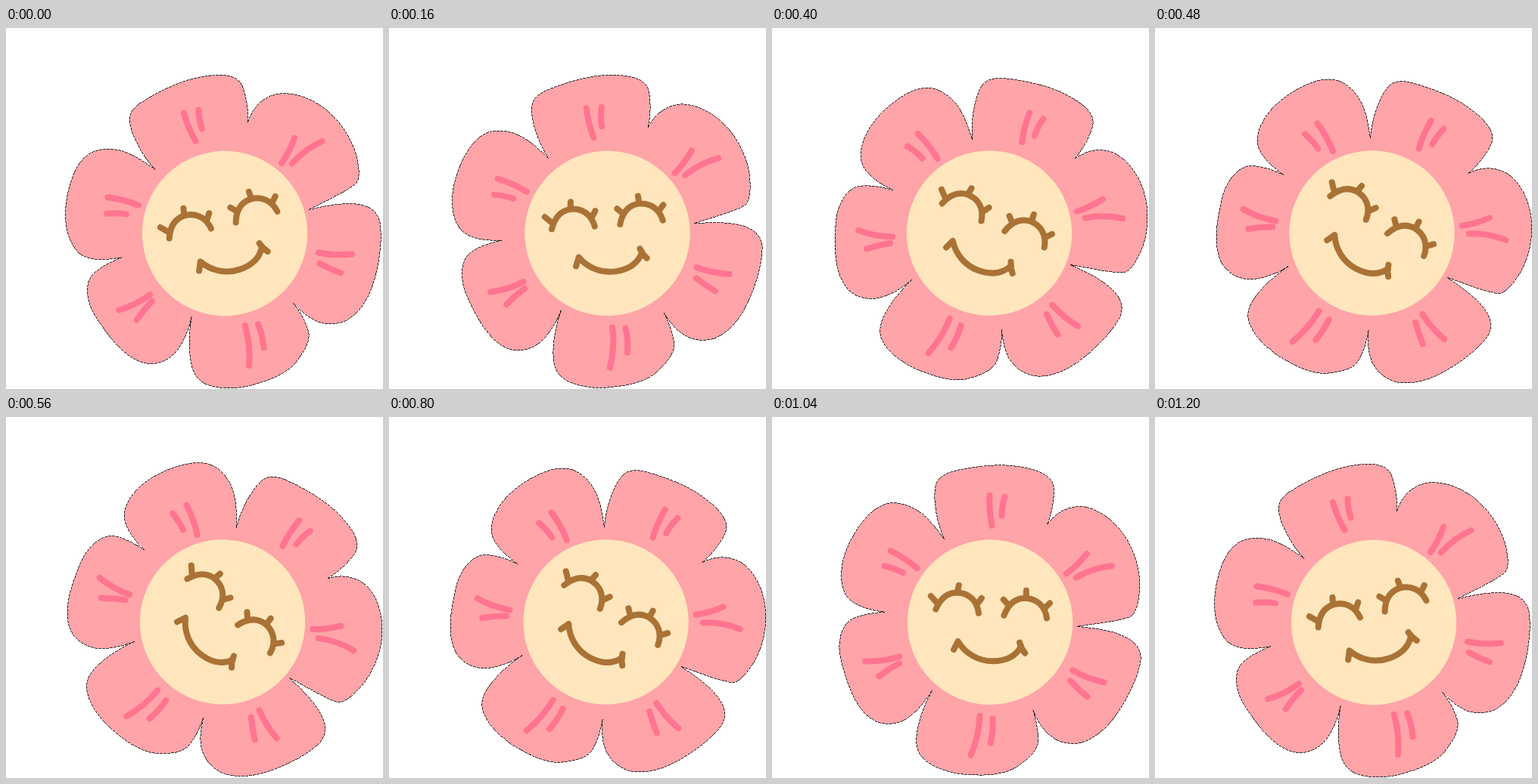
Recreate the animation shown at these times as an HTML page. Size 498x478 px, loop 1.28 s.

```html
<!DOCTYPE html>
<html lang="en">
<head>
<meta charset="utf-8">
<title>Swaying flower</title>
<style>
  html, body { margin: 0; width: 100%; height: 100%; overflow: hidden; background: #fff; }
  svg { display: block; width: 100%; height: 100%; }
  .lines { fill: none; stroke-width: 8; stroke-linecap: round; stroke-linejoin: round; }
</style>
</head>
<body>
<svg viewBox="0 0 498 478">
  <!-- Drawn upright around (288, 272) -->
  <g id="flower">
    <path fill="#ffa4a8" stroke="#000" stroke-width=".8" stroke-dasharray="4 1" shape-rendering="crispEdges" d="
      M228 162C218 140 214 112 216 96C217 82 226 75 244 71C265 66 290 64 301 64C325 64 345 69 356 74C368 80 373 87 373 97C373 115 369 130 364 143
      C374 128 390 119 408 119C436 121 462 146 474 172C484 193 486 212 486 225C485 246 481 260 474 265C456 272 427 274 403 278
      C425 280 455 284 472 295C484 303 487 311 487 322C483 350 462 388 444 408C430 423 412 434 396 433C368 432 354 412 344 388
      C349 402 351 416 351 430C349 446 333 456 322 464C308 473 284 475 268 474C245 474 225 469 208 459C196 451 190 443 190 427C192 402 201 381 211 362
      C203 376 192 389 179 398C168 406 152 408 140 404C120 397 106 372 98 346C91 324 88 312 89 300C90 284 96 272 106 267C118 261 134 259 149 258
      C125 255 105 248 97 234C90 220 91 205 94 190C100 165 118 137 134 124C146 115 157 112 167 114C196 118 212 140 228 162Z"/>
    <path class="lines" stroke="#ff7490" d="
      M288 104Q287 125 291 144M308 106Q304 118 304 131
      M416 182Q403 198 389 208M402 213Q425 200 449 198
      M397 336Q416 347 438 352M394 350Q405 362 416 371
      M274 396Q273 422 262 448M291 400Q292 415 288 432
      M123 323Q146 324 168 317M168 326Q154 333 141 343
      M157 177Q176 186 192 200M149 197Q162 200 173 206"/>
    <circle cx="288" cy="272" r="109.2" fill="#ffe6bd"/>
    <path class="lines" stroke="#aa7235" d="
      M216.500 254.500C223 239 233 232.500 244.500 232.500C260 233 271 243 273 260
      M210 237L218 246M247 223L245 232M277 240L271 248
      M306.500 263C312 248 322 240 335 240C350 241 361 251 363 267
      M306 242L313 250M336 230L336 239M367 247L360 254
      M240 308L245.500 297C255 313 272 323.500 291.500 323.500C309 323.500 322 317 329 304M327 299Q329 307 334 313"/>
  </g>
</svg>
<script>
  const LOOP = 1280, STEP = 80, LAST_POSE = 6;
  const flower = document.getElementById('flower');

  // Seven poses forward, a hold, then the same poses back.
  function poseAt(time) {
    const step = Math.floor(time % LOOP / STEP);
    return Math.max(0, Math.min(step - 1, 15 - step, LAST_POSE));
  }

  function draw(time) {
    const pose = poseAt(time);
    const angle = -18.8 + 9.3 * pose;
    const x = 289 - pose / 2;
    const y = 272 - pose * 0.1;
    flower.setAttribute('transform', `translate(${x} ${y}) rotate(${angle}) translate(-288 -272)`);
  }

  const start = performance.now();
  function tick() {
    draw(performance.now() - start);
    requestAnimationFrame(tick);
  }
  tick();
</script>
</body>
</html>
```
